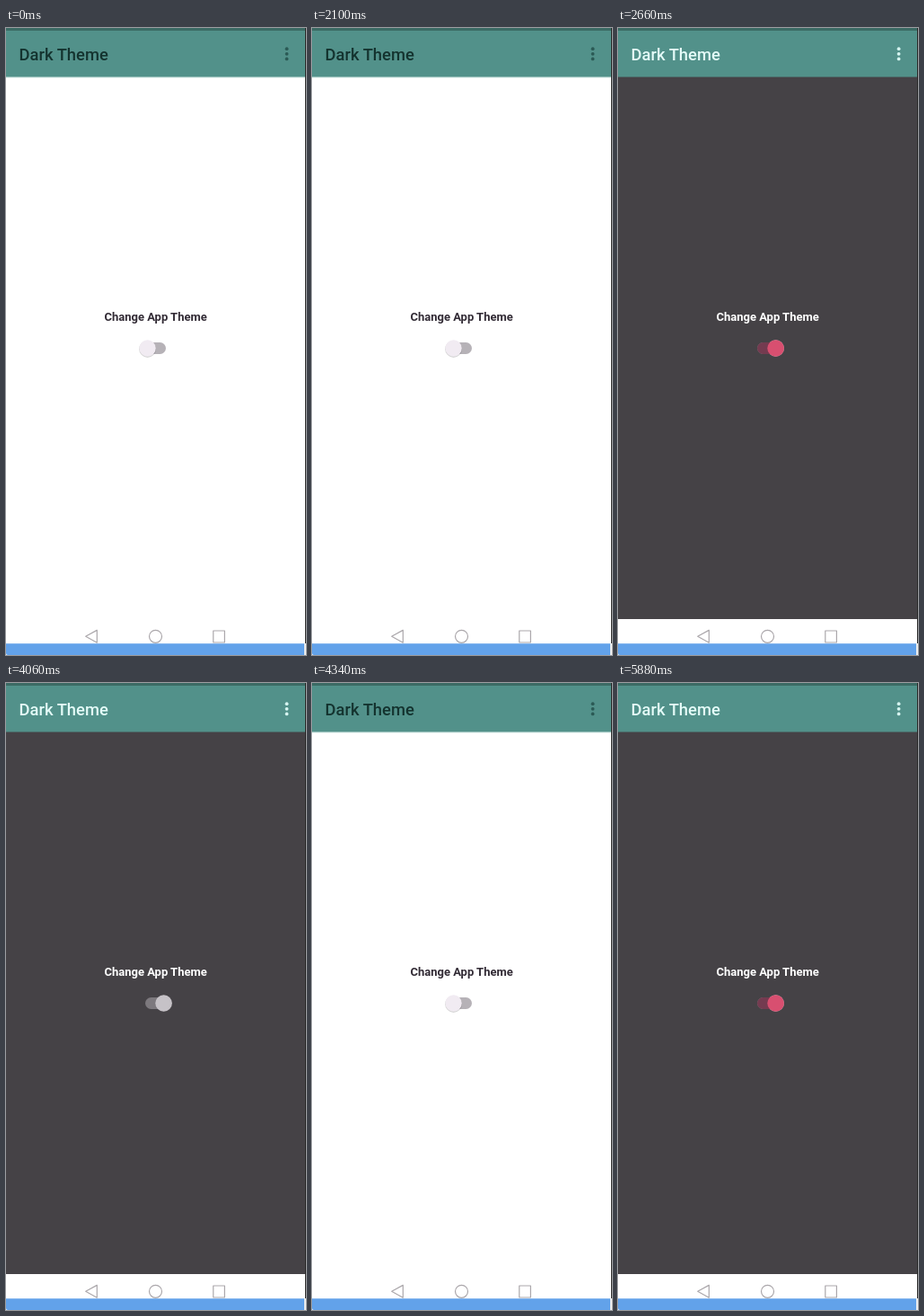
Write an HTML page that moves like this. It is 334 px wide and 698 px high and loops after 6.09 s.

```html
<!DOCTYPE html>
<html lang="en">
<head>
<meta charset="utf-8">
<title>Dark Theme</title>
<style>
html, body { margin: 0; width: 100%; height: 100%; overflow: hidden; background: #000; }
svg { display: block; width: 334px; height: 698px; font-family: Roboto, sans-serif; }
.title { font-size: 18.4px; font-weight: 500; }
.label { font-size: 13px; font-weight: 700; text-anchor: middle; }
.nav { fill: none; stroke-width: 1.2; stroke-linejoin: round; }
.light, .dark, .on { animation: 6.09s step-end infinite; }
.light { animation-name: light; }
.dark { animation-name: dark; }
.on { animation-name: on; }
/* each theme is cut to black before the other one opens */
@keyframes light {
  0% { opacity: 1; }
  35.63% { opacity: 0; }
  70.11% { opacity: 1; }
  91.95%, 100% { opacity: 0; }
}
@keyframes dark {
  0% { opacity: 0; }
  37.93% { opacity: 1; }
  67.81% { opacity: 0; }
  93.1%, 100% { opacity: 1; }
}
/* the switch tints after the dark theme opens and greys before it closes */
@keyframes on {
  0% { opacity: 0; }
  39.08% { opacity: .5; }
  40.22% { opacity: 1; }
  64.36% { opacity: .5; }
  65.51% { opacity: 0; }
  94.25% { opacity: .5; }
  95.4%, 100% { opacity: 1; }
}
</style>
</head>
<body>
<svg viewBox="0 0 334 698">
  <defs>
    <g id="nav" class="nav">
      <path d="M88.7 677.3 101.3 670.4V684.2Z"/>
      <circle cx="166.5" cy="677.3" r="7"/>
      <rect x="230.8" y="671" width="12.6" height="13"/>
    </g>
    <g id="bar">
      <rect width="333" height="54.5" fill="#52918a"/>
      <rect width="333" height="3" fill="#3c6b65"/>
    </g>
    <g id="dots">
      <circle cx="312.6" cy="23.2" r="1.9"/>
      <circle cx="312.6" cy="28.8" r="1.9"/>
      <circle cx="312.6" cy="34.4" r="1.9"/>
    </g>
  </defs>

  <rect width="334" height="698"/>
  <use href="#nav" stroke="#c9c9c9"/>
  <rect width="1" height="685" fill="#333"/>

  <g class="light">
    <rect width="333" height="698" fill="#fff"/>
    <rect y="54" width="333" height="2" fill="#e6f2f0"/>
    <use href="#bar"/>
    <text class="title" x="14.6" y="35.6" fill="#14332f">Dark Theme</text>
    <use href="#dots" fill="#2b5a55"/>
    <text class="label" x="166.6" y="325.8" fill="#322b35">Change App Theme</text>
    <rect x="150" y="350" width="28" height="13" rx="6.5" fill="#b6b2b7"/>
    <circle cx="157.6" cy="357.4" r="9.5" fill="#000" opacity=".16"/>
    <circle cx="157.6" cy="356.5" r="9.2" fill="#f1ebf2"/>
    <use href="#nav" stroke="#aba7ab"/>
  </g>

  <g class="dark">
    <rect width="333" height="698" fill="#454246"/>
    <rect y="658" width="333" height="40" fill="#fff"/>
    <use href="#bar"/>
    <text class="title" x="14.6" y="35.6" fill="#e4fbf8">Dark Theme</text>
    <use href="#dots" fill="#d5f3ef"/>
    <text class="label" x="166.6" y="325.8" fill="#fff">Change App Theme</text>
    <rect x="155" y="350" width="28" height="13" rx="6.5" fill="#7d797e"/>
    <circle cx="175.6" cy="356.5" r="9.3" fill="#c6c2c7"/>
    <g class="on">
      <rect x="155" y="350" width="28" height="13" rx="6.5" fill="#743b50"/>
      <circle cx="175.6" cy="356.5" r="9.3" fill="#d84f70"/>
    </g>
    <use href="#nav" stroke="#aba7ab"/>
  </g>

  <rect x="333" width="1" height="685" fill="#2a2a2a"/>
  <rect x="332" y="685" width="2" height="13" fill="#eee"/>
  <path d="M0 685.3H332V698H2Q0 698 0 696Z" fill="#62a2ea"/>
</svg>
</body>
</html>
```
